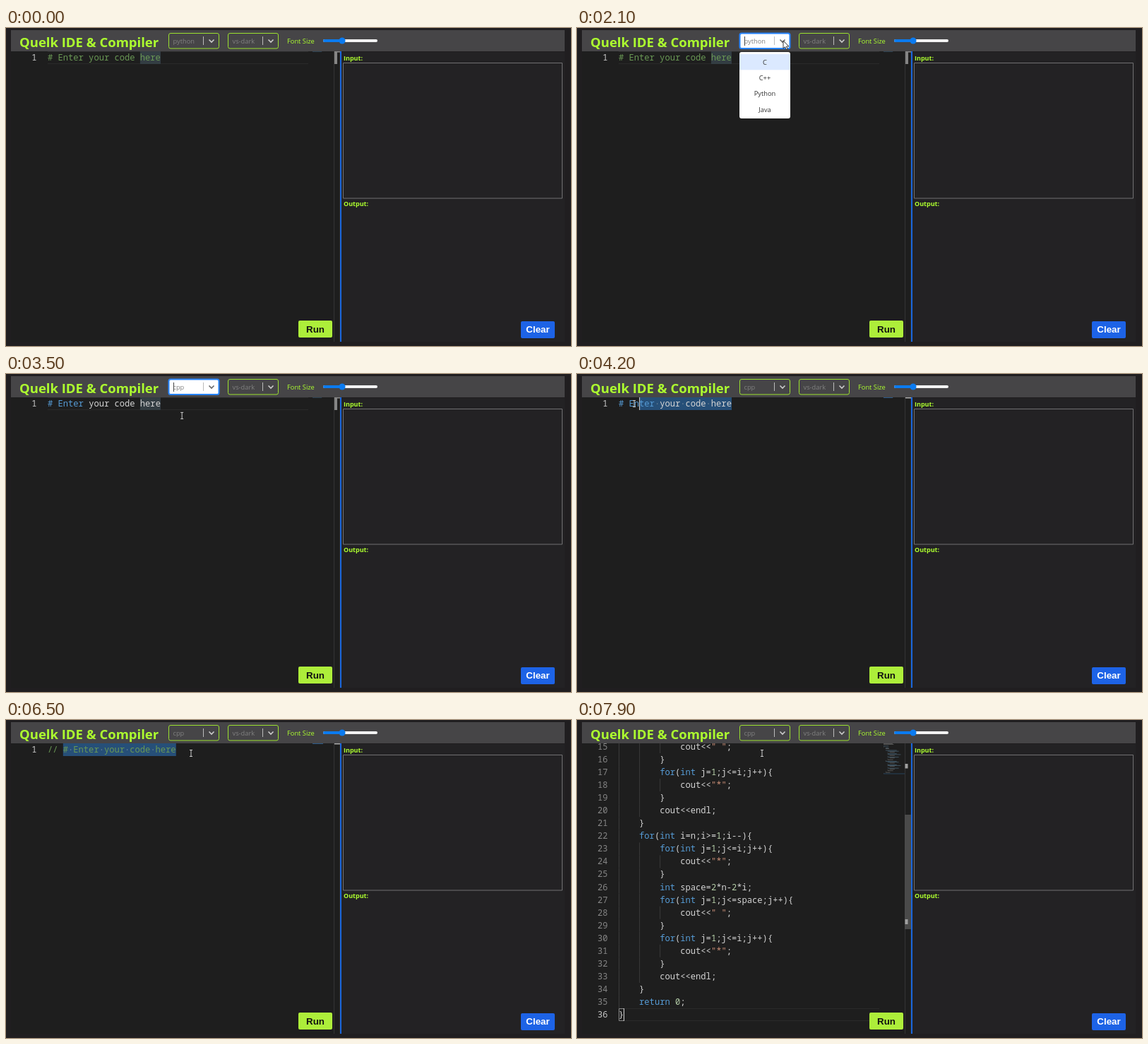
Recreate the animation shown at these times as an HTML page with a canvas. Size 800x450 px, loop 8000 ms.

```html
<!DOCTYPE html>
<html lang="en">
<head>
<meta charset="utf-8">
<style>
html, body { margin: 0; width: 100%; height: 100%; overflow: hidden; background: #201e20; }
canvas { display: block; }
</style>
</head>
<body>
<canvas id="stage" width="800" height="450"></canvas>
<script>
const ctx = document.getElementById('stage').getContext('2d');
const LOOP = 8000, STEP = 100;
const OPEN = 2000, PICK = 3200, BLUR = 3800, DRAG = 3900, COMMENT = 5600,
      SELECT_ALL = 6900, ERASE = 7300, PASTE = 7700;
const LEFT = 59, CHAR = 7.272, LINE = 18.05, LIME = '#adff2f';
const UI = '"Open Sans", sans-serif', MONO = '12.12px "Noto Sans Mono", monospace';
const BLUE = '#569cd6', GREEN = '#6a9955', PLAIN = '#d4d4d4';

const loop = (v, end, body) =>
  [`for(int ${v}=1;${v}<=${end};${v}++){`, '    ' + body, '}'];
const indent = (lines, n) => lines.map(l => ' '.repeat(n) + l);
const row = [
  ...loop('j', 'i', 'cout<<"*";'),
  'int space=2*n-2*i;',
  ...loop('j', 'space', 'cout<<" ";'),
  ...loop('j', 'i', 'cout<<"*";'),
  'cout<<endl;'
];
const program = [
  '#include<iostream>', 'using namespace std;', '', 'int main()', '{',
  '    int n;', '    cin>>n;', '',
  '    for(int i=1;i<=n;i++){', ...indent(row, 8), '    }',
  '    for(int i=n;i>=1;i--){', ...indent(row, 8), '    }',
  '    return 0;', '}'
];

// Pointer path: time, x, y
const path = [
  [1400, 300, 60], [1900, 292, 18], [2400, 292, 18], [2850, 270, 71], [3300, 270, 71],
  [3750, 220, 42], [DRAG, 220, 42], [4200, 81, 42], [4600, 58, 43], [5600, 58, 43],
  [6300, 262, 47], [LOOP, 262, 47]
];

function pointerAt(t) {
  const i = path.findIndex(p => p[0] > t);
  if (i < 1) return null;
  const [t0, x0, y0] = path[i - 1], [t1, x1, y1] = path[i];
  const u = (t - t0) / (t1 - t0), k = u * u * (3 - 2 * u);
  return { x: x0 + (x1 - x0) * k, y: y0 + (y1 - y0) * k };
}

function rect(x, y, w, h, color) {
  ctx.fillStyle = color;
  ctx.fillRect(x, y, w, h);
}

function box(x, y, w, h, r, fill, stroke, width = 1) {
  ctx.beginPath();
  ctx.roundRect(x, y, w, h, r);
  if (fill) { ctx.fillStyle = fill; ctx.fill(); }
  if (stroke) { ctx.strokeStyle = stroke; ctx.lineWidth = width; ctx.stroke(); }
}

function text(str, x, y, font, color, align = 'left') {
  ctx.font = font;
  ctx.fillStyle = color;
  ctx.textAlign = align;
  ctx.fillText(str, x, y);
}

function line(points, color, width) {
  ctx.beginPath();
  points.forEach(([x, y]) => ctx.lineTo(x, y));
  ctx.strokeStyle = color;
  ctx.lineWidth = width;
  ctx.stroke();
}

function select(x, value, focus) {
  const on = focus > 0;
  box(x + .5, 7.5, 71, 21.5, 2.5, on && `rgba(255,255,255,${focus})`,
      focus === 1 ? '#2684ff' : on ? '#7fb08a' : '#9be02f', focus === 1 ? 2 : 1);
  text(value, x + 6.5, 22, '9.3px ' + UI, '#808080');
  if (on) rect(x + 7, 12, 1, 13, '#444');
  rect(x + 49, 12, 1, 12, '#bbb');
  line([[x + 57.5, 16.5], [x + 61, 20], [x + 64.5, 16.5]], on ? '#666' : '#ccc', 1.6);
}

function header(t) {
  rect(7, 3, 784, 30, '#464547');
  text('Quelk IDE & Compiler', 19, 26.5, 'bold 18.5px ' + UI, LIME);
  const focus = t >= OPEN && t < BLUR ? Math.min(1, (t - OPEN + 100) / 400 * 2) : 0;
  select(230, t < PICK ? 'python' : 'cpp', focus);
  select(314, 'vs-dark', 0);
  text('Font Size', 398, 22, '9.3px ' + UI, LIME);
  box(449, 16, 77, 4, 2, '#f2f2f2');
  box(449, 16, 27, 4, 2, '#0b7bf0');
  box(471.5, 13.5, 9, 9, 4.5, '#0b7bf0');
}

function panels() {
  rect(475, 34, 316, 410, '#232224');
  rect(473, 33, 2, 411, '#1a66dc');
  text('Input:', 478, 46, 'bold 9px ' + UI, LIME);
  box(477.5, 49.5, 310, 191.5, 0, null, '#717072');
  text('Output:', 478, 252, 'bold 9px ' + UI, LIME);
  box(729, 415, 48, 24, 2, '#1d63e6');
  text('Clear', 753, 431, 'bold 13.33px "Liberation Sans", sans-serif', '#fff', 'center');
}

function codeText(str, x, y, color) {
  text(str, x, y, MONO, color);
}

function codeLine(str, y) {
  const token = /"[^"]*"|\b(?:for|int|return|using|namespace)\b|#\w+|\d+|[^"\d]/g;
  for (const m of str.matchAll(token)) {
    const s = m[0];
    const color = s[0] === '"' ? '#ce9178' : /^\d/.test(s) ? '#b5cea8'
      : s.length > 1 ? BLUE : PLAIN;
    codeText(s, LEFT + m.index * CHAR, y, color);
  }
}

function lineNumber(n, y, active) {
  text(n, 43.5, y, MONO, active ? '#c6c6c6' : '#858585', 'right');
}

function currentLine(y) {
  rect(LEFT, y, 369, 1, '#2a2a2a');
  rect(LEFT, y + 17, 369, 1, '#2a2a2a');
}

function firstLine(t, pointer) {
  const y = 46;
  const dragged = t >= DRAG;
  if (t >= ERASE) {
    currentLine(33);
    rect(LEFT, 33, 1, 18, '#aeafad');
  } else {
    const commented = t >= COMMENT;
    const str = (commented ? '// ' : '') + '# Enter your code here';
    let from = str.length;
    if (t >= SELECT_ALL) from = 0;
    else if (commented) from = 3;
    else if (dragged) from = Math.min(22, Math.max(0, Math.ceil((pointer.x - LEFT) / CHAR)));
    if (dragged) {
      const x = LEFT + from * CHAR;
      rect(x, 33, (str.length - from) * CHAR, 18, '#264f78');
      for (let i = from; i < str.length; i++)
        if (str[i] === ' ') codeText('·', LEFT + i * CHAR, y, '#6a8296');
      if (!commented) rect(x, 33, 1, 18, '#d0d0d0');
    } else {
      currentLine(33);
      rect(LEFT + 18 * CHAR, 33, 4 * CHAR, 18, '#333d43');
    }
    const cpp = t >= PICK && !commented;
    if (cpp) {
      codeText('# Enter', LEFT, y, BLUE);
      codeText('your code here', LEFT + 8 * CHAR, y, PLAIN);
    } else codeText(str, LEFT, y, GREEN);
    rect(434, 33, str.length * .6, 1, dragged ? '#2d5b8a' : '#2b4050');
  }
  lineNumber(1, y, true);
  if (dragged) rect(465, 33, 8, 1.5, '#aaa');
  else {
    rect(465, 33, 8, 1.5, '#888');
    rect(465, 33, 4, 18, '#858585');
  }
}

function pasted() {
  const last = program.length;
  currentLine(408);
  program.forEach((str, i) => {
    const y = 421 - (last - 1 - i) * LINE;
    const depth = str.search(/\S/) / 4;
    if (y > 30) {
      for (let d = 0; d < depth; d++)
        rect(LEFT + d * 4 * CHAR, y - 13, 1, LINE, '#3b3b3b');
      codeLine(str, y);
      lineNumber(i + 1, y, i === last - 1);
    }
    const start = Math.max(0, depth * 4);
    rect(434 + start * .72, 33 + i * 1.2, (str.length - start) * .72, .7,
         /for|int/.test(str) ? 'rgba(110,160,195,.55)' : 'rgba(190,190,190,.45)');
  });
  rect(434, 75.5, 30, 1, '#26425a');
  box(LEFT + .5, 408.5, 7, 17, 0, null, '#888');
  rect(66, 408, 1, 18, '#d0d0d0');
  rect(464, 134, 9, 162, '#4a4a4a');
  rect(464.5, 62, 4, 6.5, '#a0a0a0');
  rect(464.5, 282, 4, 7, '#a0a0a0');
}

function editor(t, pointer) {
  rect(7, 33, 466, 411, '#1e1e1e');
  rect(464, 33, 1, 411, '#343435');
  rect(472, 33, 1, 411, '#2a2a2b');
  ctx.save();
  ctx.beginPath();
  ctx.rect(7, 33, 466, 411);
  ctx.clip();
  if (t >= PASTE) pasted();
  else firstLine(t, pointer);
  ctx.restore();
  box(414, 414, 48, 24, 2, '#adee3a');
  text('Run', 438, 430.5, 'bold 13.33px "Liberation Sans", sans-serif', '#111', 'center');
}

function menu(pointer) {
  box(230, 34, 72, 94, 3, '#fff');
  const hot = Math.max(0, Math.floor((pointer.y - 37) / 22.3));
  ['C', 'C++', 'Python', 'Java'].forEach((label, i) => {
    const y = 37 + i * 22.3;
    if (i === hot) rect(230, y, 72, 22.3, '#dbe9ff');
    text(label, 266, y + 14.7, '9.3px ' + UI, '#333', 'center');
  });
}

function drawPointer({ x, y }, arrow) {
  ctx.save();
  ctx.translate(x, y);
  if (arrow) {
    ctx.beginPath();
    [[0, 0], [0, 11], [2.6, 8.7], [4.4, 12.6], [6.2, 11.8], [4.5, 8], [8, 8]]
      .forEach(p => ctx.lineTo(...p));
    ctx.closePath();
    ctx.fillStyle = '#fff';
    ctx.fill();
    ctx.strokeStyle = '#222';
    ctx.lineWidth = .9;
    ctx.stroke();
  } else {
    rect(-.5, -4.5, 1, 9, '#ccc');
    rect(-2, -5, 4, 1, '#ccc');
    rect(-2, 4, 4, 1, '#ccc');
  }
  ctx.restore();
}

function draw(t) {
  const pointer = pointerAt(t);
  const open = t >= OPEN && t < PICK;
  rect(0, 0, 800, 450, '#201e20');
  editor(t, pointer);
  panels();
  header(t);
  if (open) menu(pointer);
  if (pointer) drawPointer(pointer, open || pointer.y < 33);
}

function frame() {
  draw(Math.floor(performance.now() % LOOP / STEP) * STEP);
  requestAnimationFrame(frame);
}
frame();
</script>
</body>
</html>
```
